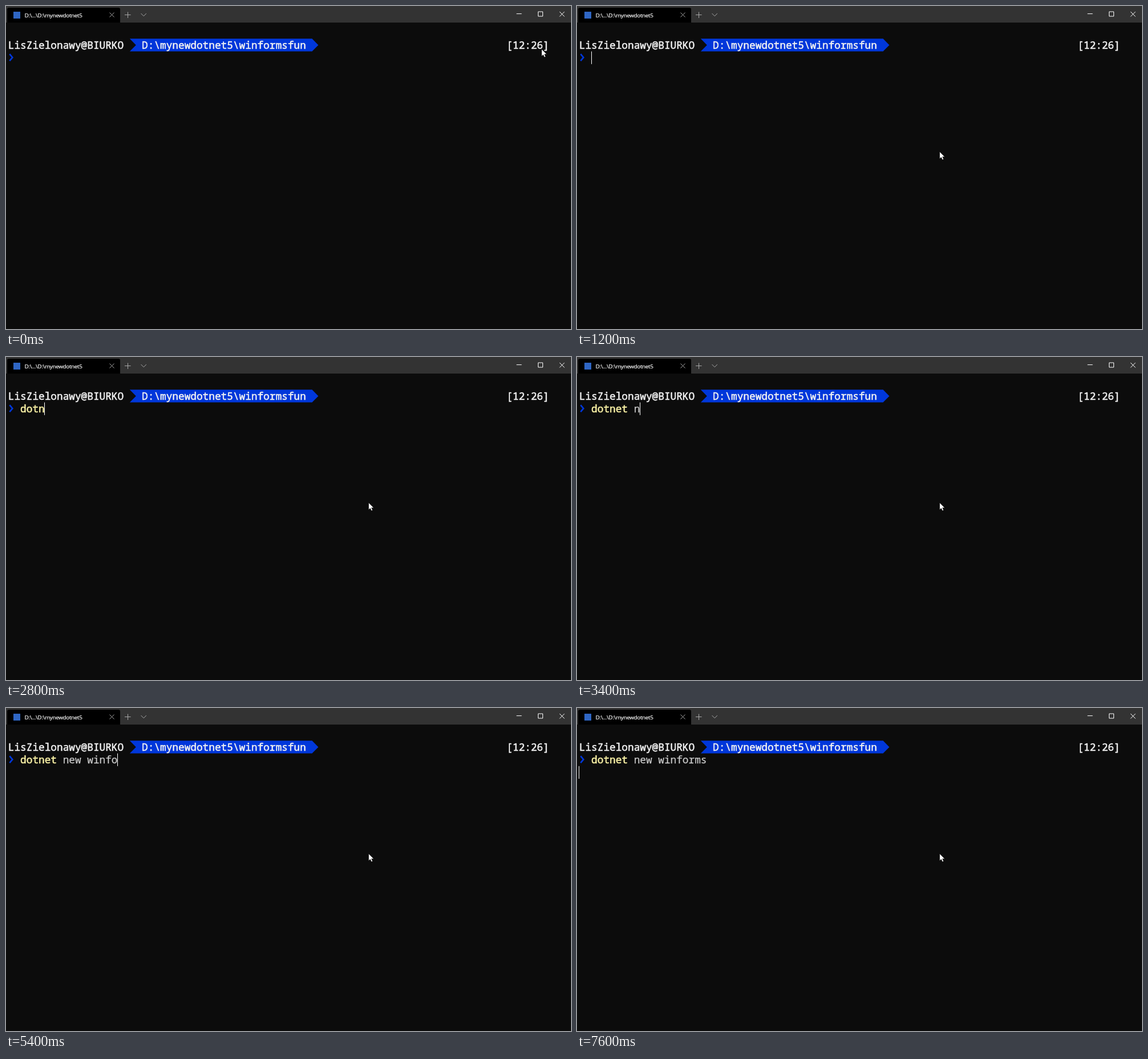
These frames come from a looping animation (990 by 566 pixels, 8000 ms). An HTML page:

```html
<!DOCTYPE html>
<html lang="en">
<head>
<meta charset="utf-8">
<title>Terminal</title>
<style>
  html, body { margin: 0; width: 100%; height: 100%; overflow: hidden; background: #0c0c0c; }
  svg { display: block; width: 100%; height: 100%; }
  text { white-space: pre; }
  .mono { font: 400 17.75px "Noto Sans Mono", "DejaVu Sans Mono", monospace; font-variant-ligatures: none; }
  .title { font: 400 9.8px "Open Sans", "Noto Sans", sans-serif; letter-spacing: -.27px; }
  .mono, .title, tspan { fill: currentColor; stroke: currentColor; }
  .mono { color: #f2f2f2; stroke-width: .55; }
  .title { color: #fff; stroke-width: .2; }
  #args { color: #ccc; stroke-width: .25; }
  .icon { fill: none; stroke: #fff; }
  .dim { stroke: #a8a8a8; }
</style>
</head>
<body>
<svg viewBox="0 0 990 566">
  <rect width="990" height="566" fill="#0c0c0c"/>

  <!-- title bar -->
  <rect width="990" height="29" fill="#333"/>
  <path d="M2 29V6a3 3 0 0 1 3-3H197a3 3 0 0 1 3 3V29Z" fill="#000"/>
  <rect x="13" y="10" width="12" height="12" fill="#2f66c4"/>
  <text class="title" x="32.5" y="19.5">D:\...\D:\mynewdotnet5</text>
  <path class="icon dim" d="M181.5 11.5l8 8m0-8l-8 8M208 15.5h10.5M213.5 10.5v10.5M236.5 13l4.7 4.7 4.7-4.7"/>
  <path class="icon" d="M894.5 13.6h9M932.5 10h8v8h-8zM970 10l8.5 8.5m0-8.5l-8.5 8.5"/>

  <!-- prompt -->
  <path d="M216.8 57.3H536.3L547.3 68.5 536.3 79.6H216.8L227.8 68.5Z" fill="#0037da"/>
  <g class="mono">
    <text x="3.8" y="75">LisZielonawy@BIURKO</text>
    <text x="238.1" y="75">D:\mynewdotnet5\winformsfun</text>
    <text x="877.1" y="75">[12:26]</text>
    <text x="25.1" y="97"><tspan id="command"></tspan><tspan id="args"></tspan></text>
  </g>
  <path d="M6.3 84.2l5 6-5 6" fill="none" stroke="#0037da" stroke-width="2.7"/>
  <rect id="caret" width="1" height="22.2" fill="#fff"/>
  <path id="mouse" d="M0 0V12.6L2.8 10 4.8 14.3 7 13.3 5.1 9.1H9Z" fill="#fff" stroke="#000" stroke-width=".6"/>
</svg>
<script>
const LOOP = 8000, TICK = 100, BLINK = 550, CELL = 10.65, LEFT = 3.8, ROW = 22.2;

// One character per tick; a dash is a pause.
const KEYS = "d---o-t---ne-t -new -w-i-n--------f-orm---s----\n";
const TYPING_START = 1800, CARET_START = 150, MOVE_TIME = 500;

const [command, args, caret, mouse] =
  ["command", "args", "caret", "mouse"].map(id => document.getElementById(id));
const ease = p => p * p * (3 - 2 * p);
const mix = (from, to, p) => from + (to - from) * p;

function draw(time) {
  const tick = Math.floor(time / TICK) * TICK;
  const played = KEYS.slice(0, Math.max(0, (tick - TYPING_START) / TICK + 1));
  const [line, nextLine] = played.replaceAll("-", "").split("\n");
  const [, word, rest] = line.match(/^(\w*)(.*)$/);
  command.textContent = word;
  command.style.color = word === "do" ? "#16c60c" : "#f9f1a5";
  args.textContent = rest;

  // Every key press restarts the caret's blinking.
  const lastKey = played.search(/[^-]-*$/);
  const blinkStart = lastKey < 0 ? CARET_START : TYPING_START + lastKey * TICK;
  const phase = Math.floor((tick + TICK - 1 - blinkStart) / BLINK);
  const entered = nextLine !== undefined;
  const column = entered ? 0 : line.length + 2;
  caret.setAttribute("x", Math.floor(LEFT + column * CELL));
  caret.setAttribute("y", 79.6 + entered * ROW);
  caret.setAttribute("opacity", phase % 2 === 0 ? 1 : 0);

  const moved = ease(Math.min(1, tick / MOVE_TIME));
  mouse.setAttribute("transform",
    `translate(${mix(938.5, 635.4, moved)} ${mix(75.5, 255.2, moved)})`);
}

const start = performance.now();
function frame() {
  draw((performance.now() - start) % LOOP);
  requestAnimationFrame(frame);
}
frame();
</script>
</body>
</html>
```
